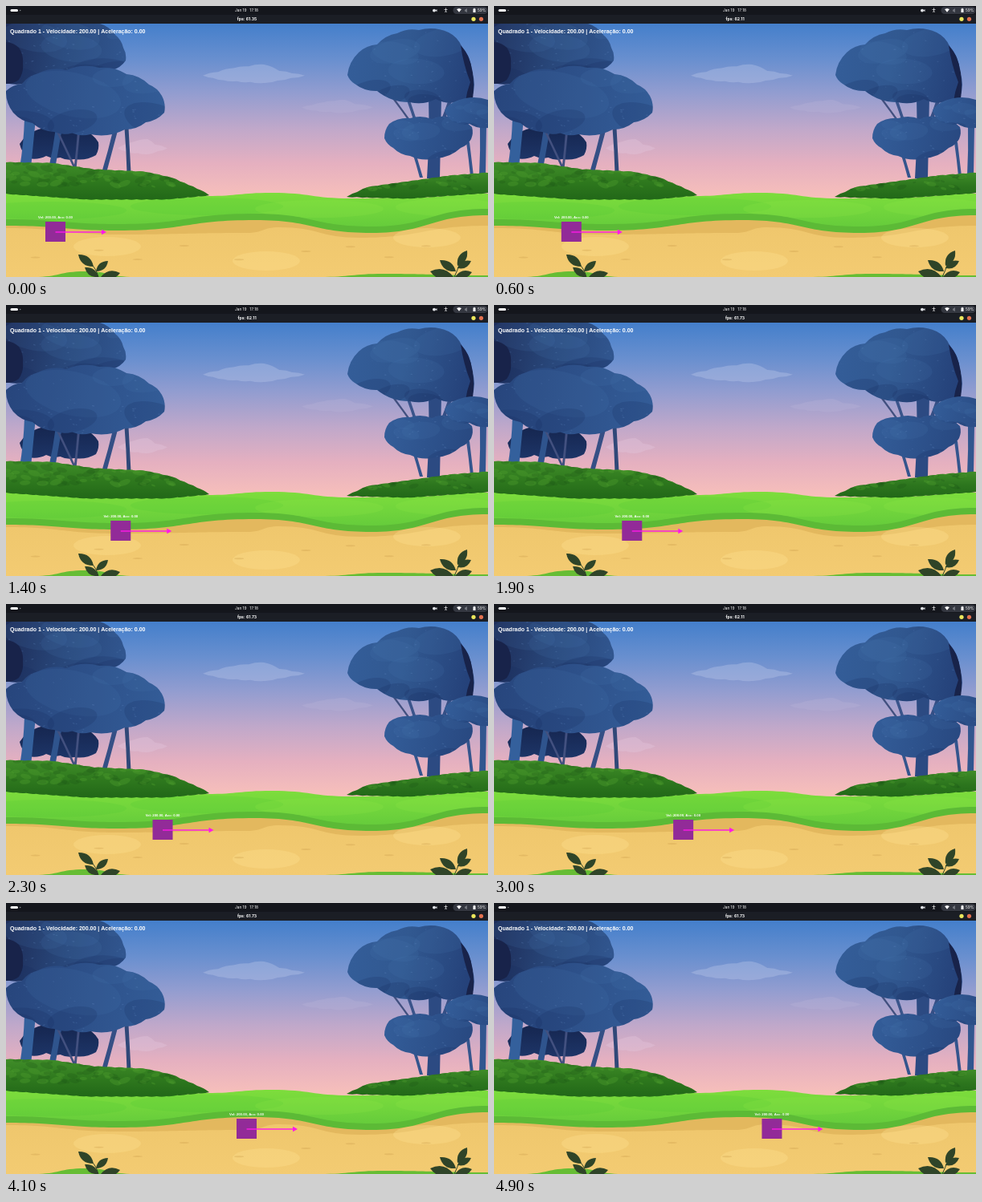
Animation, 600 px wide and 338 px high, one loop 5000 ms. Source, as an HTML page with a canvas:

```html
<!DOCTYPE html>
<html lang="pt">
<head>
<meta charset="utf-8">
<style>
html, body { margin: 0; height: 100%; overflow: hidden; background: #14161c; }
canvas { display: block; width: 600px; height: 338px; }
</style>
</head>
<body>
<canvas id="stage" width="600" height="338"></canvas>
<script>
const stage = document.getElementById('stage').getContext('2d');
const scenery = document.createElement('canvas');
scenery.width = 600;
scenery.height = 338;
const g = scenery.getContext('2d');

let seed = 7;
const rnd = () => (seed = seed * 16807 % 2147483647) / 2147483647;
const pairs = s => s.split(' ').map(p => p.split(',').map(Number));

function gradient(x0, y0, x1, y1, ...colors) {
  const fill = g.createLinearGradient(x0, y0, x1, y1);
  colors.forEach((c, i) => fill.addColorStop(i / (colors.length - 1), c));
  return fill;
}

function paint(path, fill) {
  g.fillStyle = fill;
  g.fill(path);
  return path;
}

// Clockwise outline, each side split into outward bumps about `step` long.
function lobes(keys, fill, step = 30, bulge = .18) {
  const pts = pairs(keys), path = new Path2D();
  path.moveTo(...pts[0]);
  pts.forEach(([x, y], i) => {
    const [u, v] = pts[(i + 1) % pts.length];
    const n = Math.max(1, Math.round(Math.hypot(u - x, v - y) / step));
    const dx = (u - x) / n, dy = (v - y) / n;
    for (let k = 0; k < n; k++) {
      const px = x + dx * k, py = y + dy * k;
      path.quadraticCurveTo(px + dx / 2 + dy * bulge, py + dy / 2 - dx * bulge, px + dx, py + dy);
    }
  });
  path.closePath();
  return paint(path, fill);
}

// Smooth hill line through the points, moved down by `shift`.
function ridge(keys, fill, shift = 0) {
  const p = pairs(keys), path = new Path2D();
  path.moveTo(p[0][0], 338);
  path.lineTo(p[0][0], p[0][1] + shift);
  for (let i = 1; i < p.length; i++) {
    const [x, y] = p[i - 1], [u, v] = p[i], m = (x + u) / 2;
    path.bezierCurveTo(m, y + shift, m, v + shift, u, v + shift);
  }
  path.lineTo(p[p.length - 1][0], 338);
  return paint(path, fill);
}

function ellipse(x, y, rx, ry, fill, turn = 0) {
  g.fillStyle = fill;
  g.beginPath();
  g.ellipse(x, y, rx, ry, turn, 0, 7);
  g.fill();
}

const poly = (points, fill) => paint(new Path2D('M' + points + 'Z'), fill);

// Seeded soft patches inside a shape.
function patches(path, x, y, w, h, count, size, colors) {
  g.save();
  g.clip(path);
  for (let i = 0; i < count; i++) {
    const r = size * (.4 + rnd());
    ellipse(x + w * rnd(), y + h * rnd(), r, r * .45, colors[i % colors.length], rnd() * .8 - .4);
  }
  g.restore();
}

function canopy(keys, x, y, w, h, ...colors) {
  const path = lobes(keys, gradient(x, y, x + w, y + h * .4, ...colors));
  patches(path, x, y, w, h * .6, 4, w * .22, ['rgba(75,120,175,.14)']);
  patches(path, x, y + h * .8, w, h * .2, 4, w * .2, ['rgba(24,44,92,.2)']);
  patches(path, x, y, w, h, w * .3, 1.2, ['rgba(100,140,195,.25)']);
}

function trunk(x, y, u, v, width, fill) {
  const m = (x + u) / 2, w = width / 2;
  paint(new Path2D(`M${x - w},${y}Q${m - w * .7},${(y + v) / 2} ${u - w},${v}H${u + w}Q${m + w},${(y + v) / 2} ${x + w},${y}Z`), fill);
}

function cloud(x, y, w, h, fill) {
  const at = (a, b) => `${x + w * a},${y + h * b}`;
  lobes([at(0, .6), at(.3, .2), at(.6, 0), at(.75, .35), at(1, .6), at(.6, 1), at(.2, .85)].join(' '), fill, 16, .1);
}

function text(c, str, x, y, font, align = 'left') {
  c.font = font;
  c.textAlign = align;
  c.fillStyle = '#fff';
  c.fillText(str, x, y);
}

function sky() {
  g.fillStyle = gradient(0, 22, 0, 240, '#447fcb', '#688fcf', '#939dd0', '#c0a8ca', '#e5b0c0', '#f8c0ba');
  g.fillRect(0, 22, 600, 220);
  cloud(245, 73, 127, 23, 'rgba(185,197,230,.38)');
  cloud(368, 117, 89, 16, 'rgba(185,180,215,.3)');
  cloud(139, 166, 62, 19, 'rgba(225,195,218,.4)');
}

function leftTrees() {
  canopy('0,22 117,22 136,36 146,52 149,68 132,80 60,92 0,96', 0, 22, 150, 74, '#1d2c58', '#284679', '#31568f');
  lobes('0,45 16,52 21,72 16,92 0,97', '#18234a');
  lobes('17,172 40,154 95,154 115,170 112,186 85,191 50,187 28,190', gradient(0, 150, 0, 194, '#15254e', '#1e3669'), 20);
  trunk(30, 140, 24, 202, 14, '#34609c');
  trunk(66, 152, 57, 203, 8, '#2f548d');
  trunk(62, 152, 86, 203, 3, '#42507f');
  trunk(91, 152, 86, 203, 3, '#42507f');
  trunk(137, 152, 122, 208, 6, '#354f85');
  trunk(150, 152, 153, 208, 5, '#304878');
  canopy('0,106 20,97 40,84 75,80 116,77 150,85 178,98 194,112 197,133 174,145 148,154 105,160 60,157 33,146 9,133', 0, 77, 198, 83, '#27457c', '#2d5089', '#335c97');
}

function rightTrees() {
  trunk(482, 115, 506, 148, 3, '#42507f');
  trunk(500, 115, 511, 148, 4, '#3a548a');
  trunk(534, 112, 532, 215, 16, '#2c4a82');
  trunk(555, 112, 541, 150, 5, '#354f85');
  trunk(594, 148, 593, 212, 8, '#31568f');
  trunk(575, 170, 580, 212, 4, '#34558d');
  trunk(507, 180, 517, 214, 4, '#34558d');
  canopy('425,86 439,58 462,48 487,34 514,30 551,33 567,50 580,82 580,114 560,120 535,116 503,120 462,106 434,97', 424, 28, 157, 95, '#345e9a', '#315890', '#25427a');
  lobes('566,49 575,62 581,83 581,116 572,119 578,95', '#18234a', 40, .06);
  canopy('471,165 477,147 503,140 530,141 556,139 580,151 579,166 566,177 535,190 503,187 482,177', 470, 137, 115, 55, '#345e9a', '#284880');
  canopy('546,130 562,118 600,117 600,152 577,147 556,144', 545, 116, 55, 37, '#345e9a', '#2b4e87');
}

function ground() {
  ridge('0,234 120,240 200,240 250,237 330,233 430,240 500,239 600,234', gradient(0, 233, 0, 283, '#7ddd3c', '#70d43c', '#61c83b'));
  const leaves = ['rgba(74,153,43,.42)', 'rgba(24,80,20,.22)'];
  const left = lobes('0,195 57,196 110,204 174,207 206,214 238,228 253,236 200,241 100,241 0,234', gradient(0, 196, 0, 241, '#3f8c28', '#2f791e', '#226818'), 12, .1);
  patches(left, 0, 195, 250, 30, 90, 6, leaves);
  const right = lobes('424,238 450,226 500,219 550,212 600,208 600,233 500,240', gradient(0, 208, 0, 240, '#3f8c28', '#2d761e', '#226818'), 12, .1);
  patches(right, 424, 207, 176, 22, 60, 5, leaves);

  for (const [x, y, r] of pairs('55,255,95 250,250,95 390,253,80 550,251,65'))
    ellipse(x, y, r, 11, x < 300 ? 'rgba(76,191,54,.18)' : 'rgba(147,231,71,.2)');

  const path = '0,274 140,280 310,267 455,283 600,261';
  ridge(path, '#5cba36', -8);
  ridge(path, '#e3b85e');
  ridge('0,277 140,285 300,283 340,276 440,289 600,274', gradient(0, 275, 0, 338, '#efc76d', '#f3cb72'));
  for (const [x, y] of pairs('126,300 324,318 524,289')) ellipse(x, y, 42, 12, 'rgba(252,224,145,.35)');
  for (let i = 0; i < 9; i++) {
    const x = 20 + 60 * (i + rnd()), y = 295 + 22 * rnd();
    ellipse(x, y, 6, 1, 'rgba(211,166,82,.4)');
  }
  ridge('35,338 98,331 160,338', '#66bd34');
  ridge('390,338 470,334 600,336', '#66bd34');
}

function leaf(x, y, u, v) {
  const mx = (x + u) / 2, my = (y + v) / 2, dx = (u - x) * .42, dy = (v - y) * .42;
  paint(new Path2D(`M${x},${y}Q${mx + dy},${my - dx} ${u},${v}Q${mx - dy},${my + dx} ${x},${y}Z`), '#2f4428');
}

function plants() {
  g.strokeStyle = '#2f4428';
  g.stroke(new Path2D('M106,322Q112,327 115,338M565,320Q562,330 558,338'));
  leaf(109, 325, 90, 310);
  leaf(112, 331, 127, 318);
  leaf(115, 338, 98, 326);
  leaf(118, 338, 142, 333);
  leaf(562, 324, 574, 305);
  leaf(560, 331, 540, 317);
  leaf(562, 327, 579, 318);
  leaf(557, 338, 528, 331);
  leaf(559, 338, 580, 332);
}

function pill(x, y, w, h, fill) {
  g.fillStyle = fill;
  g.beginPath();
  g.roundRect(x, y, w, h, h / 2);
  g.fill();
}

function bars() {
  g.fillStyle = '#14161c';
  g.fillRect(0, 0, 600, 11);
  g.fillStyle = '#1b1e25';
  g.fillRect(0, 11, 600, 11);
  pill(5.5, 4, 9.5, 3, '#fff');
  ellipse(17.7, 5.5, .8, .8, '#85888e');
  text(g, 'Jan 19\u2002 17:18', 299.5, 7.3, '4.8px Inter, sans-serif', 'center');

  pill(531, 3.7, 4, 3.8, '#dfe1e5');
  poly('534.5,5.5 536.5,4 536.5,7.2', '#dfe1e5');
  ellipse(547.5, 3.1, .7, .7, '#fff');
  g.strokeStyle = '#eee';
  g.lineWidth = .7;
  g.stroke(new Path2D('M545.5,4.5h4M547.5,4v2l-1,2M547.5,6l1,2'));
  pill(556.5, 1, 43, 9, '#343740');
  poly('561,4 564,3 567,4 564,7.8', '#fff');
  poly('571,4.7 574,3 574,8 571,6.4', '#70737b');
  g.fillStyle = '#fff';
  g.fillRect(581.5, 3.5, 3, 4.5);
  g.fillRect(582.3, 2.8, 1.4, 1);
  text(g, '59%', 587, 7.3, '4.8px Inter, sans-serif');
  ellipse(582, 16.3, 2.6, 2.6, '#ece75c');
  ellipse(591.5, 16.3, 2.6, 2.6, '#e2704f');
}

sky();
leftTrees();
rightTrees();
ground();
plants();
bars();
text(g, 'Quadrado 1 - Velocidade: 200.00 | Aceleração: 0.00', 5, 33.6,
  'bold 7px "Liberation Sans", Arial, sans-serif');

function fps(t) {
  if (t < 600) return '61.35';
  return t >= 1900 && t < 2500 || t >= 3700 ? '61.73' : '62.11';
}

function draw() {
  const t = Math.floor(performance.now() % 5000 / 100) * 100;
  const x = 49 + t * .05805, mid = x + 12.5, c = stage;
  c.drawImage(scenery, 0, 0);
  text(c, 'fps: ' + fps(t), 300, 18.2, 'bold 5.1px Inter, sans-serif', 'center');
  c.fillStyle = '#922b98';
  c.fillRect(x, 269, 25, 25);
  c.fillStyle = '#ff18e8';
  c.fillRect(mid, 281.3, 59, 1.4);
  c.beginPath();
  c.moveTo(mid + 57.5, 278.8);
  c.lineTo(mid + 63.5, 282);
  c.lineTo(mid + 57.5, 285.2);
  c.fill();
  text(c, 'Vel: 200.00, Acc: 0.00', mid, 264.7,
    'bold 4.25px "Liberation Sans", Arial, sans-serif', 'center');
  requestAnimationFrame(draw);
}
draw();
</script>
</body>
</html>
```
